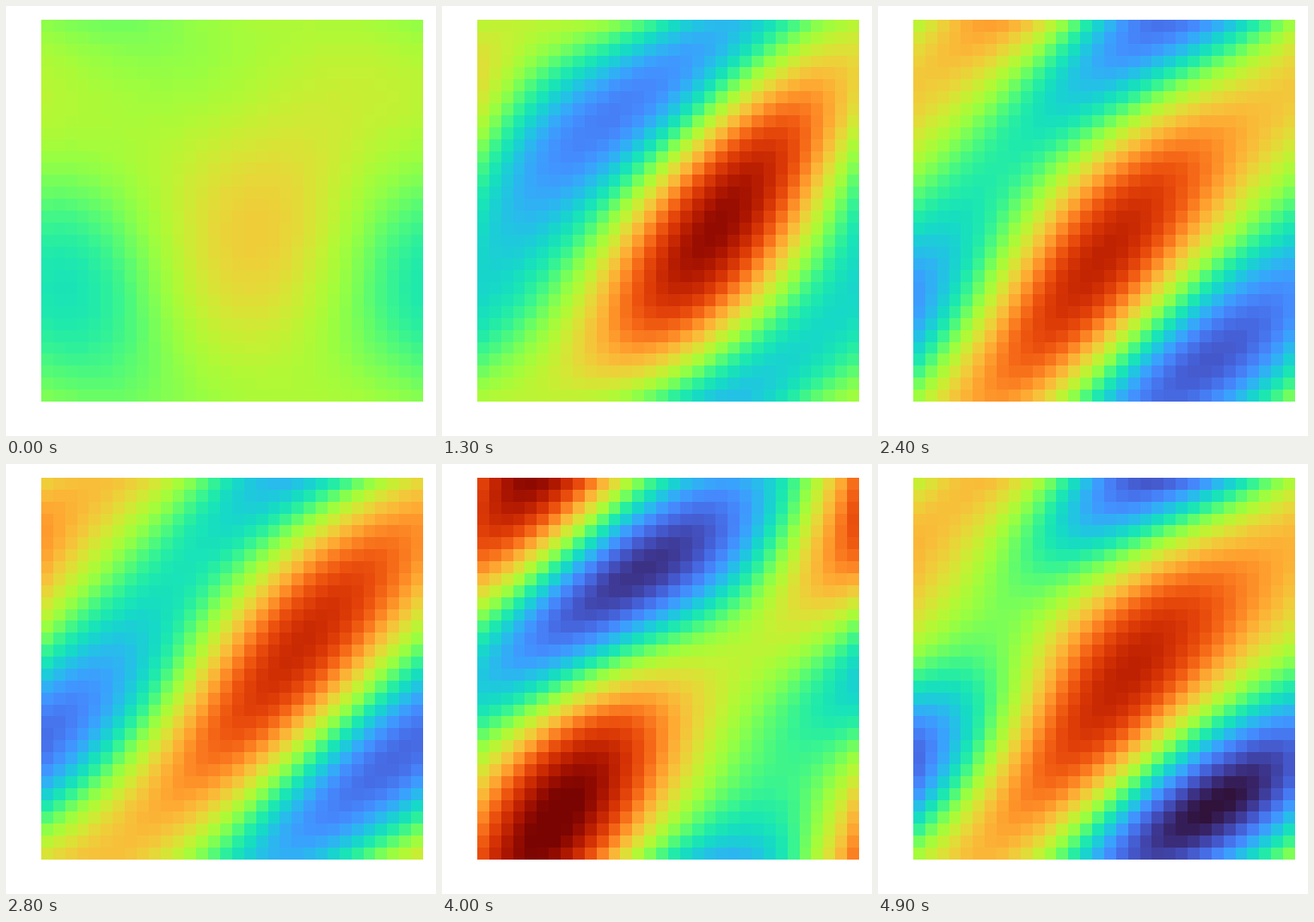
Animation of 500 by 500 pixels, one loop 5000 ms. Source, as a matplotlib script:

```python
"""A diagonal vorticity band with two drifting wave trains, one second per frame."""
import numpy as np
import matplotlib.pyplot as plt
from matplotlib.animation import FuncAnimation

CELLS, FRAMES, INTERVAL = 32, 50, 100
DRIFT = 0.26      # radians per second
SETTLE = 5        # seconds for the band to build up
STEEPEN = 3.8     # how far the flow has tilted its own vortices

angle = 2 * np.pi * np.arange(CELLS) / CELLS
X, Y = angle[:, None], angle[None, :]      # down, right
KX = np.fft.fftfreq(CELLS, 1 / CELLS)[:, None]
KY = np.arange(CELLS // 2 + 1)[None, :]
LAP = KX**2 + KY**2
FINE = LAP > 2
LAP[0, 0] = 1


def fade(t):
    return np.exp(-t / SETTLE)


def turn(t):
    return DRIFT * (t - SETTLE * (1 - fade(t)))


# Key moments: time, then strength and angle (degrees) of each train
KEYS = np.array([
    (0, 0.055, -110, 0.016, 69),
    (13, 0.049, -127, 0.100, 119),
    (20, 0.104, 131, 0.004, 56),
    (28, 0.076, -107, 0.005, -145),
    (33, 0.020, -142, 0.117, -149),
    (40, 0.141, 77, 0.031, 22),
    (49, 0.117, -151, 0.049, -111),
])
TIMES = KEYS[:, 0]


def train(t, column, direction):
    """Complex amplitude, eased between key moments in the drifting frame."""
    strength, degrees = KEYS[:, column], KEYS[:, column + 1]
    slow = strength * np.exp(1j * (np.radians(degrees) - direction * turn(TIMES)))
    return np.interp(t, TIMES, slow) * np.exp(1j * direction * turn(t))


def harmonics(field):
    """Finer detail made by the flow carrying its own vorticity along."""
    w = np.fft.rfft2(field)
    psi = w / LAP
    u, v, wx, wy = np.fft.irfft2(np.array(
        [1j * KY * psi, -1j * KX * psi, 1j * KX * w, 1j * KY * w]))
    return np.fft.irfft2(FINE * np.fft.rfft2(-u * wx - v * wy))


def vorticity(t):
    band = (0.27 - 0.235 * fade(t)) * np.cos(X + Y - 0.825 + 0.005 * t)
    cross = 0.038 * fade(t) * np.cos(X - Y - 0.82)
    up, down = train(t, 1, 1), train(t, 3, -1)
    waves = ((up + down) * np.exp(1j * X)
             + (up - down) * np.exp(-1j * (Y + np.pi / 4))).real
    field = band + cross + waves
    return 0.5 + field + STEEPEN * harmonics(field)


fig = plt.figure(figsize=(5, 5), dpi=100, facecolor="white")
ax = fig.add_axes([41 / 500, 40 / 500, 444 / 500, 444 / 500])
ax.axis("off")
image = ax.imshow(vorticity(0), cmap="turbo", vmin=0, vmax=1,
                  interpolation="nearest", aspect="auto")


def update(frame):
    image.set_data(vorticity(frame))
    return [image]


anim = FuncAnimation(fig, update, frames=FRAMES, interval=INTERVAL,
                     repeat=True, repeat_delay=0)
plt.show()
```
